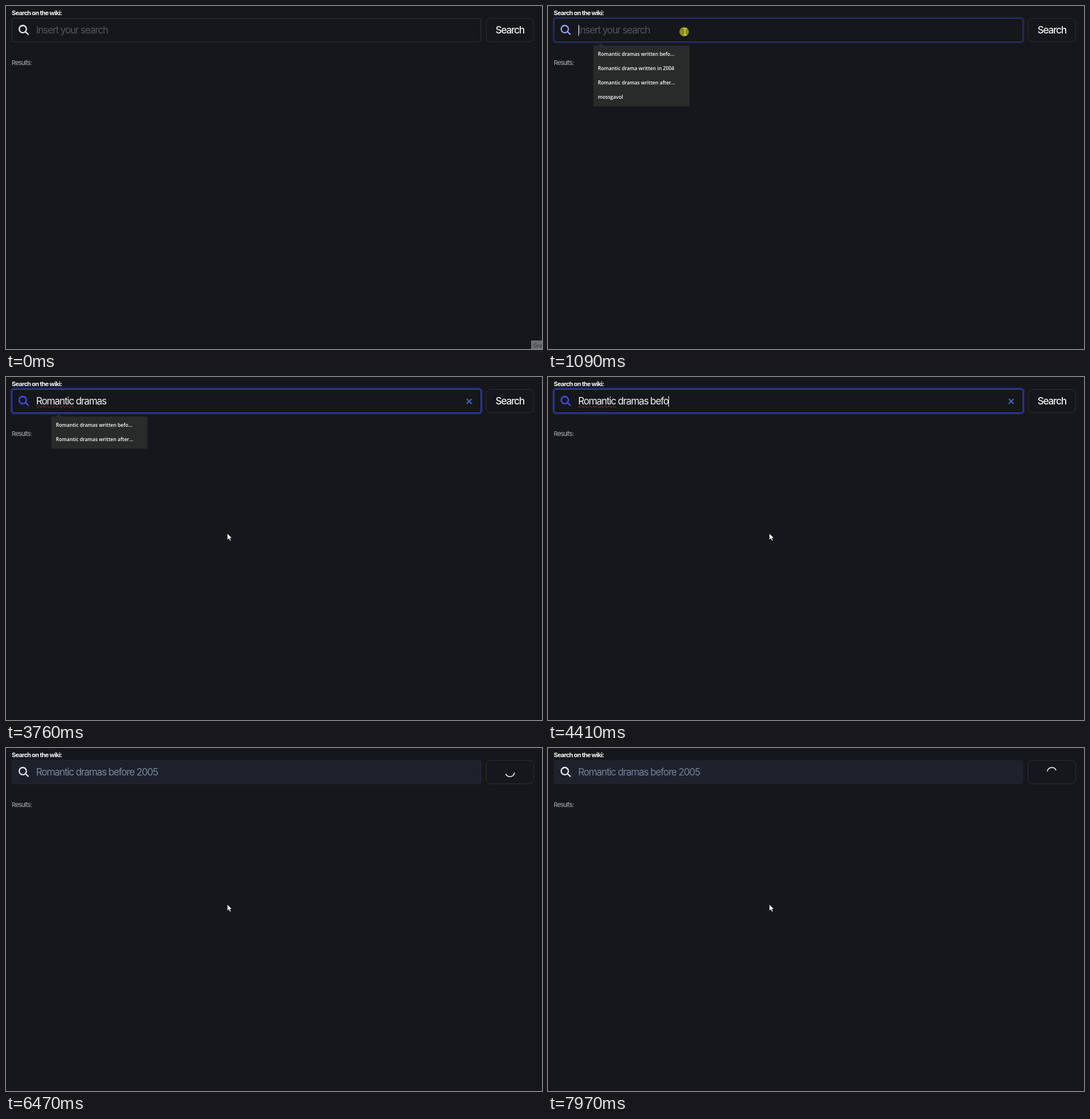
These frames come from a looping animation (935 px wide and 599 px high, 8000 ms). An HTML page:

```html
<!DOCTYPE html>
<html lang="en">
<head>
<meta charset="utf-8">
<title>Wiki search</title>
<style>
  html, body { margin: 0; width: 100%; height: 100%; overflow: hidden; background: #15171a; }
  #stage { position: relative; width: 935px; height: 599px; overflow: hidden; background: #15171a;
    font: 17px/20px Inter, sans-serif; letter-spacing: -.067em; color: #f2f3f5; }
  #stage > *, svg { position: absolute; }
  .small { left: 10px; font-size: 11px; line-height: 14px; letter-spacing: -.07em; white-space: nowrap; }
  #label { top: 5px; font-weight: 700; }
  #results { top: 91.5px; color: #aeb0b5; }
  #field, #button { box-sizing: border-box; top: 21px; height: 42px; border: 1px solid #2e3038; }
  #field { left: 10px; width: 819px; border-radius: 4px; }
  #button { left: 837px; width: 84px; border-radius: 9px; font-weight: 500; line-height: 40px; text-align: center; }
  #hint, #text { left: 52.5px; top: 32px; white-space: pre; }
  #hint { color: #50545c; }
  #text u { text-decoration: underline wavy #b3262f .8px; text-underline-offset: 1px; text-decoration-skip-ink: none; }
  #caret { position: absolute; top: 1px; width: 1px; height: 19px; background: #f2f3f5; }
  #popup { left: 79px; top: 69px; width: 168px; padding: 3px 0; background: #292a2a;
    font: 600 8.6px/25px "Open Sans", "Noto Sans", sans-serif; letter-spacing: 0; color: #fff; }
  #popup::before { content: ""; position: absolute; left: 8px; top: -4px;
    border: solid transparent; border-width: 0 5px 4px; border-bottom-color: #292a2a; }
  #rows div { padding-left: 8px; white-space: nowrap; }
  #tip { left: 916px; top: 584px; width: 40px; height: 15px; background: #6b6d70; color: #292a2c;
    font: 9px/18px "Open Sans", "Noto Sans", sans-serif; letter-spacing: 0; text-indent: 4px; }
  svg { left: 0; top: 0; overflow: visible; fill: none; }
</style>
</head>
<body>
<div id="stage">
  <div id="label" class="small">Search on the wiki:</div>
  <div id="results" class="small">Results:</div>
  <div id="field"></div>
  <div id="button"><span id="caption">Search</span></div>
  <div id="hint">Insert your search</div>
  <div id="text"><span id="typed"></span><span id="caret"></span></div>
  <div id="popup"><div id="rows"></div></div>
  <div id="tip">Gravar</div>
  <svg width="935" height="599">
    <g id="lens" stroke-width="2.3" stroke-linecap="round">
      <circle cx="29.3" cy="40.3" r="6.3"/><path d="M34 45 38.7 49.4"/>
    </g>
    <path id="clear" d="M803.7 38.2l8.6 8.6m0-8.6l-8.6 8.6" stroke="#3b66b3" stroke-width="2.3"/>
    <path id="spinner" d="M-7.7 -2.1A8 8 0 0 1 7.7 -2.1" stroke="#dfe0e3" stroke-width="1.8"/>
    <g id="pointer">
      <circle id="press" r="8.3" fill="#8d8b0a"/>
      <path id="beam" d="M-1.5 -5.5h2q1 0 1 1v9q0 1-1 1h-2M4.5 -5.5h-2q-1 0-1 1M4.5 5.5h-2q-1 0-1-1" stroke="#e8e8d8"/>
      <path id="arrow" d="M0 0V11.6L2.7 9.1 4.6 13.2 6.6 12.3 4.8 8.3H8.2Z" fill="#fff" stroke="#08090a" stroke-width=".7"/>
    </g>
  </svg>
</div>
<script>
const LOOP = 8000, FOCUS = 1030, CARET = 1085, SUBMIT = 6290;
const QUERY = "Romantic dramas before 2005";
const KEYS = [1700, 1800, 1900, 1980, 2050, 2130, 2200, 2340, 2480,
  2710, 2870, 2940, 3030, 3120, 3260, 3800, 3860, 3980, 4240, 4410, 4470, 4520, 4580,
  4880, 5090, 5170, 5250];
const HISTORY = [
  ["Romantic dramas written before", "Romantic dramas written befo..."],
  ["Romantic drama written in 2004", "Romantic drama written in 2004"],
  ["Romantic dramas written after", "Romantic dramas written after..."],
  ["mossgavol", "mossgavol"]
];

const ui = Object.fromEntries([...document.querySelectorAll("[id]")].map(e => [e.id, e]));
const ramp = (t, from, to) => Math.min(1, Math.max(0, (t - from) / (to - from)));
const easeOut = p => 1 - (1 - p) ** 3;
const easeInOut = p => p * p * (3 - 2 * p);
const mix = (a, b, p) => `color-mix(in srgb, ${b} ${(p * 100).toFixed(1)}%, ${a})`;
const show = (el, on) => { el.style.visibility = on ? "visible" : "hidden"; };
const bezier = (a, b, c, p) =>
  a.map((v, i) => (1 - p) ** 2 * v + 2 * p * (1 - p) * b[i] + p * p * c[i]);

let shown = -1;
function drawText(count) {
  if (count === shown) return;
  shown = count;
  const typed = QUERY.slice(0, count);
  ui.typed.innerHTML = typed.replace(/(Romantic|before)(?= )/g, "<u>$1</u>");
  // The list keeps its last matches while it fades away.
  const prefix = typed.slice(0, 15);
  ui.rows.innerHTML = HISTORY.filter(([full]) => full.startsWith(prefix))
    .map(([, label]) => `<div>${label}</div>`).join("");
}

function drawPointer(t) {
  const [x, y] = t < 1120
    ? bezier([897, 600], [520, 260], [237.5, 45], easeInOut(ramp(t, 420, 970)))
    : bezier([237.5, 45], [272, 115], [386, 273], easeInOut(ramp(t, 1120, 1230)));
  const inField = x > 10 && x < 829 && y > 21 && y < 63;
  ui.pointer.setAttribute("transform", `translate(${x} ${y})`);
  show(ui.beam, inField && t > 420);
  show(ui.arrow, !inField && t > 420);
  show(ui.press, t >= 1000 && t < 1130);
}

function draw(t) {
  const count = KEYS.filter(k => k <= t).length;
  const sent = t >= SUBMIT;
  const off = easeOut(ramp(t, SUBMIT, SUBMIT + 300));
  const focus = easeOut(ramp(t, FOCUS, FOCUS + 300)) * (1 - off);
  drawText(count);
  drawPointer(t);

  const lastKey = count ? KEYS[count - 1] : CARET;
  show(ui.caret, t >= CARET && !sent && (t - lastKey) % 1030 < 500);
  show(ui.hint, !count);
  show(ui.clear, count && !sent);
  ui.typed.style.color = mix("#f2f3f5", "#70809a", off);
  for (const u of ui.typed.children) u.style.textDecorationColor = sent ? "transparent" : "";

  ui.field.style.background = mix("#15171a", "#1e222c", off);
  ui.field.style.borderColor = mix(mix("#32343c", "#1e222c", off), "#404de0", focus);
  ui.field.style.boxShadow = `0 0 0 2.5px rgba(62, 74, 235, ${0.34 * focus})`;
  ui.lens.style.stroke = mix("#eceef2", "#4650fa", focus);

  show(ui.popup, t >= 1070 && t < 4010);
  ui.popup.style.opacity = 1 - ramp(t, 3850, 4010);
  ui.tip.style.opacity = t < 30 ? 1 : t < 70 ? 0.5 : 0;

  show(ui.caption, !sent);
  show(ui.spinner, sent);
  ui.spinner.setAttribute("transform", `translate(879 42) rotate(${(t - 7070) * 0.36 + 28})`);
}

const start = performance.now();
function tick() {
  draw((performance.now() - start) % LOOP);
  requestAnimationFrame(tick);
}
tick();
</script>
</body>
</html>
```
